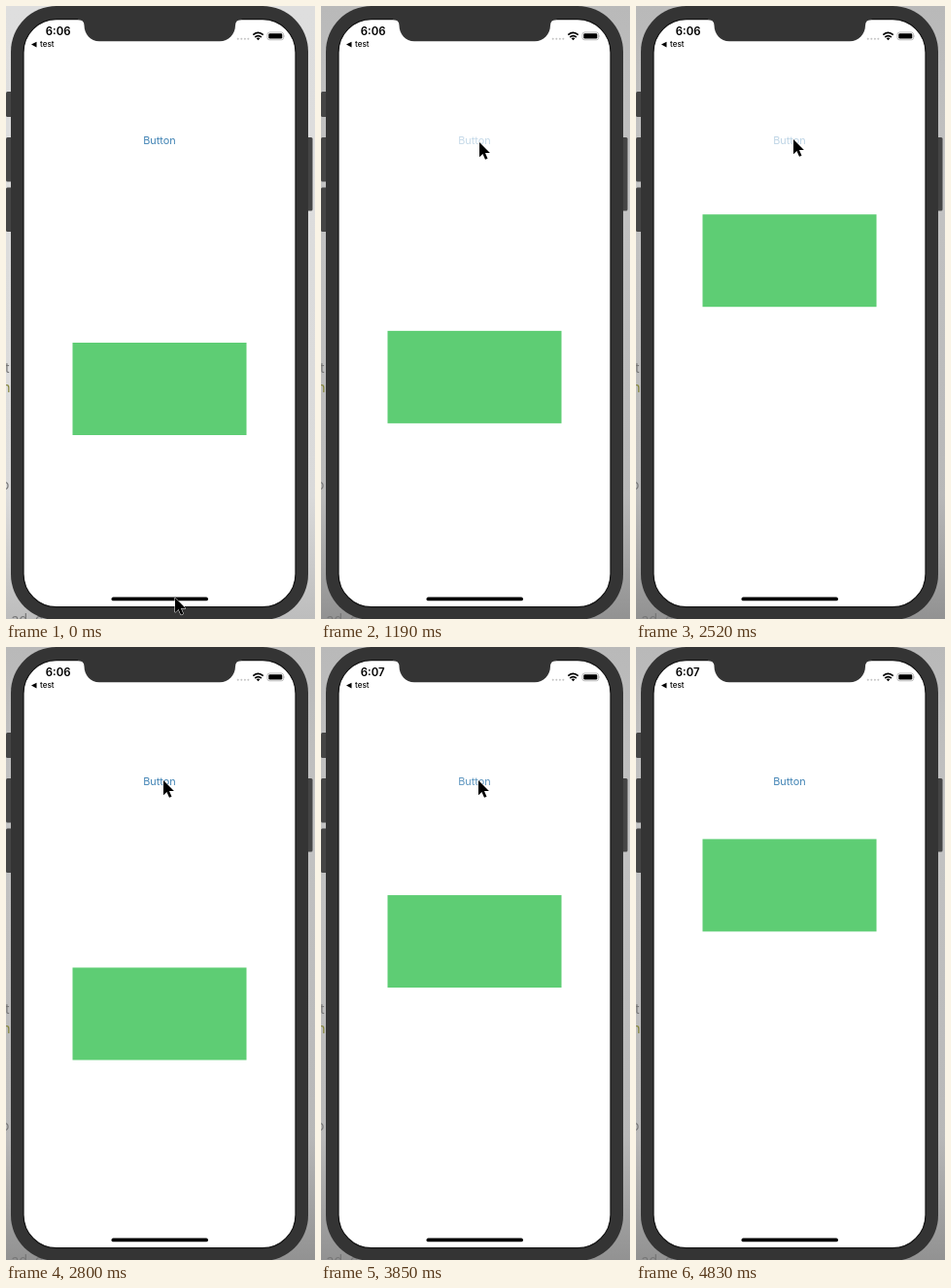
Write an HTML page that moves like this. It is 318 by 630 pixels and loops after 5.6 s.

```html
<!DOCTYPE html>
<html lang="en">
<head>
<meta charset="utf-8">
<title>Button moves a box</title>
<style>
  html, body { margin: 0; width: 100%; height: 100%; overflow: hidden; background: #ddd; }
  svg { display: block; width: 318px; height: 630px; }
  text { font-family: Inter, Roboto, "Liberation Sans", sans-serif; }
  .code { font-size: 14px; text-anchor: end; fill: #777; }
</style>
</head>
<body>
<svg viewBox="0 0 318 630">
  <defs>
    <linearGradient id="idle" x2="0" y2="1">
      <stop offset="0" stop-color="#dedede"/>
      <stop offset=".8" stop-color="#dadada"/>
      <stop offset="1" stop-color="#bdbdbd"/>
    </linearGradient>
    <linearGradient id="active" x2="0" y2="1">
      <stop offset="0" stop-color="#b9b9b9"/>
      <stop offset=".3" stop-color="#c2c2c2"/>
      <stop offset=".8" stop-color="#b8b8b8"/>
      <stop offset="1" stop-color="#929292"/>
    </linearGradient>
  </defs>

  <rect id="back" width="318" height="630" fill="url(#idle)"/>
  <text class="code" x="3.5" y="377">t</text>
  <text class="code" x="4.5" y="397" style="fill:#85853a">n</text>
  <text class="code" x="3.5" y="497">o</text>
  <text class="code" x="38" y="635">ad, c</text>

  <g fill="#454545">
    <rect x="0" y="88" width="7" height="26" rx="1.5"/>
    <rect x="0" y="135" width="7" height="45.5" rx="1.5"/>
    <rect x="0" y="186.500" width="7" height="45.5" rx="1.5"/>
    <rect x="309" y="135" width="6.500" height="75.5" rx="1.5"/>
  </g>
  <rect x="5" y="0" width="306" height="631" rx="47" fill="#343434"/>
  <rect x="18" y="13.700" width="280" height="604" rx="34" fill="#fff" stroke="#151515" stroke-width="1.2"/>
  <path d="M74 13 V14 Q80.500 14 80.500 20 C80.500 29 87 36.300 96 36.300 H220 C229 36.300 236 29 236 20 Q236 14 242.500 14 V13 Z" fill="#343434"/>

  <text id="clock" x="40.800" y="30.200" font-size="11.4" font-weight="600">6:06</text>
  <path d="M26 39.600 L31.500 36.800 V42.400 Z"/>
  <text x="35" y="42.400" font-size="8.1" font-weight="500">test</text>
  <g fill="#c4c4c4">
    <circle cx="238.700" cy="33.800" r="1"/><circle cx="242.300" cy="33.800" r="1"/>
    <circle cx="245.900" cy="33.800" r="1"/><circle cx="249.300" cy="33.800" r="1"/>
  </g>
  <g fill="none" stroke="#000" stroke-width="1.7">
    <path d="M254.300 29.700 Q259.500 25 264.700 29.700"/>
    <path d="M256.200 32 Q259.500 29.100 262.800 32"/>
  </g>
  <path d="M257.600 33.300 Q259.500 31.800 261.400 33.300 L259.500 35.300 Z"/>
  <rect x="269" y="27" width="16.600" height="7.800" rx="2.200" fill="#fff" stroke="#aaa" stroke-width=".8"/>
  <rect x="270.300" y="28.300" width="14" height="5.200" rx="1.200"/>
  <path d="M286.500 29.500 q1.300 1.400 0 2.800 Z" fill="#aaa"/>

  <text id="label" x="158" y="141.500" font-size="10.9" text-anchor="middle" fill="#4284b5">Button</text>
  <rect id="box" x="68.500" y="346" width="179" height="95" fill="#5ecd74"/>
  <rect x="108.500" y="607.500" width="99.500" height="3.800" rx="1.900"/>
  <circle id="ring" r="21.500" fill="#fff" fill-opacity=".3" stroke="#000" stroke-width="1.500"/>
  <path id="arrow" d="M0 0 V15.200 L3.500 12 L6 17.800 L8.500 16.700 L6 11 H10.900 Z" stroke="#fff" stroke-width="1" paint-order="stroke"/>
</svg>
<script>
const LOOP = 5600, STEP = 70, MOVE = 525, FADE = 420;
const LOW = 346, HIGH = 197.4;
const $ = id => document.getElementById(id);

// pressed at, box starts at, from, to
const taps = [
  { press: 980, go: 1085, from: LOW, to: HIGH },
  { press: 2310, go: 2397, from: HIGH, to: LOW },
  { press: 3430, go: 3553, from: LOW, to: HIGH }
];

// pointer: time, x, y
const path = [
  [0, 174, 608], [70, 173.5, 597], [140, 172, 550], [210, 170, 462],
  [280, 168, 362], [350, 167, 277], [420, 166, 217], [490, 165.5, 180],
  [560, 165, 157], [630, 164.5, 143], [700, 163.6, 141], [770, 163, 140],
  [1750, 163, 140], [1820, 162.5, 138], [1890, 162, 137],
  [4410, 162, 137], [4480, 162, 150], [4550, 161, 205], [4620, 159, 305],
  [4690, 157, 430], [4760, 155.5, 560], [4830, 155, 640], [LOOP, 155, 640]
];

const clamp = v => Math.min(1, Math.max(0, v));

// cubic-bezier(.42, 0, .58, 1)
function ease(x) {
  x = clamp(x);
  let lo = 0, hi = 1, s = .5;
  for (let i = 0; i < 20; i++) {
    s = (lo + hi) / 2;
    const bx = 1.26 * (1 - s) ** 2 * s + 1.74 * (1 - s) * s * s + s ** 3;
    if (bx < x) lo = s; else hi = s;
  }
  return s * s * (3 - 2 * s);
}

function pointer(t) {
  const i = path.findIndex(p => p[0] > t);
  const [t0, x0, y0] = path[i - 1], [t1, x1, y1] = path[i];
  const k = (t - t0) / (t1 - t0);
  return [x0 + (x1 - x0) * k, y0 + (y1 - y0) * k];
}

function draw(t) {
  const [x, y] = pointer(t);
  const tap = taps.filter(p => t >= p.press).pop();
  const held = tap && t < tap.press + 2 * STEP;
  let top = LOW, alpha = 1;
  if (tap) {
    top = tap.from + (tap.to - tap.from) * ease((t - tap.go) / MOVE);
    alpha = .2 + .8 * ease((t - tap.go) / FADE);
  }
  $("arrow").setAttribute("transform", `translate(${x} ${y})`);
  $("ring").setAttribute("transform", `translate(${x - .5} ${y + .5})`);
  $("ring").style.display = held ? "" : "none";
  $("box").setAttribute("y", top);
  $("label").setAttribute("opacity", alpha);
  $("back").setAttribute("fill", t < 980 ? "url(#idle)" : "url(#active)");
  $("clock").textContent = t < 3220 ? "6:06" : "6:07";
}

const start = performance.now();
function tick(now) {
  const t = Math.max(0, now - start) % LOOP;
  draw(Math.floor(t / STEP) * STEP);
  requestAnimationFrame(tick);
}
draw(0);
requestAnimationFrame(tick);
</script>
</body>
</html>
```
